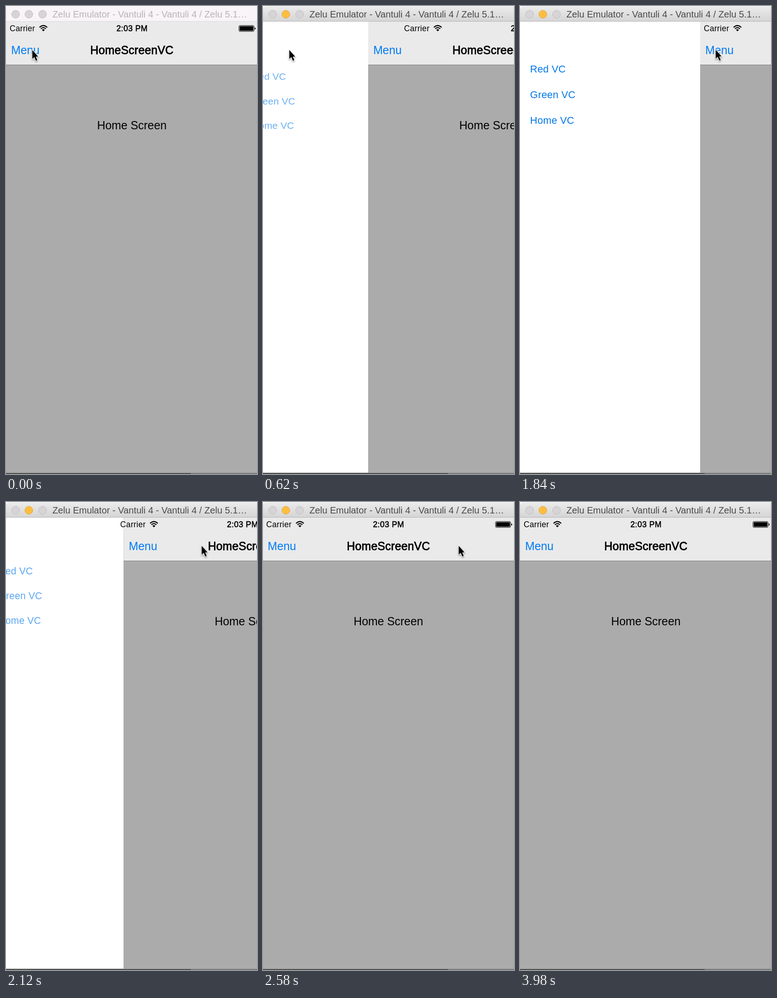
These frames come from a looping animation (549x1021 px, 4.04 s). An HTML page:

```html
<!DOCTYPE html>
<html lang="en">
<head>
<meta charset="utf-8">
<title>Slide-out menu</title>
<style>
  :root {
    --loop: 4040ms;
    --fall: cubic-bezier(.3333, 0, .6667, .3333); /* constant acceleration */
    --open: 395px;
  }
  html, body { margin: 0; width: 100%; height: 100%; overflow: hidden; background: #fff; }
  #stage {
    position: relative; width: 549px; height: 1021px; overflow: hidden; background: #fff;
    font-family: "Liberation Sans", Arial, Helvetica, sans-serif;
  }
  #stage div, #stage svg { position: absolute; }
  .text { white-space: pre; line-height: 30px; height: 30px; }
  .medium { -webkit-text-stroke: .8px #000; }

  /* window chrome */
  #bar {
    left: 0; top: 1px; width: 549px; height: 32px; border-radius: 6px 0 0 0;
    border-bottom: 1px solid #b4b4b4;
    background: linear-gradient(#ebebeb, #d5d5d5);
    animation: bar-focus var(--loop) step-end infinite;
  }
  .light {
    top: 8px; width: 16px; height: 16px; border-radius: 50%;
    background: #d6d4d6; border: 1px solid #bfbdbf;
  }
  #mid { background: #fdbe40; border-color: #e2a436; animation: mid-focus var(--loop) step-end infinite; }
  #label {
    left: 101.5px; top: 2px; font-size: 20.2px; color: #4a4a4a;
    animation: label-focus var(--loop) step-end infinite;
  }
  @keyframes bar-focus {
    0% { background: #f8f4f8; border-color: #dcd9dc; }
    3.465%, 100% { background: linear-gradient(#ebebeb, #d5d5d5); border-color: #b4b4b4; }
  }
  @keyframes mid-focus {
    0% { background: #d6d4d6; border-color: #bfbdbf; }
    3.465%, 100% { background: #fdbe40; border-color: #e2a436; }
  }
  @keyframes label-focus {
    0% { color: #b7b4b7; }
    3.465%, 100% { color: #4a4a4a; }
  }

  /* drawer: every part falls open and falls shut */
  #menu {
    left: 0; top: 34px; width: 549px; height: 984px; color: #0377e8;
    font-size: 21.96px; letter-spacing: .2px;
    animation: menu var(--loop) var(--fall) infinite;
  }
  #menu .text { left: 22.4px; }
  #pane {
    left: 0; top: 34px; width: 552px; height: 984px; background: #ababab;
    font-size: 24.9px; animation: pane var(--loop) var(--fall) infinite;
  }
  #nav { left: 0; top: 0; width: 552px; height: 94px; background: #eaeaea; border-bottom: 1px solid #7e7e7e; }
  #status {
    left: 0; top: 34px; width: 549px; height: 30px;
    font-size: 17.57px; letter-spacing: .3px; animation: status var(--loop) var(--fall) infinite;
  }
  @keyframes pane {
    0%, 5.569% { transform: translateX(0); }
    18.416%, 44.926% { transform: translateX(var(--open)); }
    57.772% { transform: translateX(-1px); animation-timing-function: step-end; }
    65.35%, 100% { transform: translateX(0); }
  }
  /* the status bar runs slightly ahead of the pane */
  @keyframes status {
    0%, 5.569% { transform: translateX(0); }
    16.807%, 44.926% { transform: translateX(var(--open)); }
    57.104% { transform: translateX(-1px); animation-timing-function: step-end; }
    65.35%, 100% { transform: translateX(0); }
  }
  @keyframes menu {
    0%, 5.569%, 57.772%, 100% { transform: translateX(-137.5px) scale(.9); opacity: 0; }
    18.416%, 44.926% { transform: translateX(0) scale(1); opacity: 1; }
  }

  /* pointer */
  #cursor {
    left: 0; top: 0; width: 24px; height: 36px; overflow: visible;
    filter: drop-shadow(0 2px 1.5px rgba(0, 0, 0, .35));
    animation: cursor var(--loop) ease-in-out infinite;
  }
  @keyframes cursor {
    0%, 26.73% { transform: translate(57px, 95px); }
    40.1%, 67.8% { transform: translate(427.5px, 94.5px); }
    83.2%, 100% { transform: translate(-30px, 100px); }
  }

  /* strip below the window */
  #edge { left: 0; top: 1018px; width: 549px; height: 3px; background: linear-gradient(#9a9a9a 1px, #777 1px); }
  #edge div { left: 0; top: 1px; width: 404px; height: 2px; background: #4a4a4a; }
</style>
</head>
<body>
<div id="stage">
  <div id="menu">
    <div class="text" style="top:89px">Red VC</div>
    <div class="text" style="top:145px">Green VC</div>
    <div class="text" style="top:201px">Home VC</div>
  </div>

  <div id="pane">
    <div id="nav">
      <div class="text" style="left:11.2px;top:47px;color:#007af5">Menu</div>
      <div class="text medium" style="left:184.3px;top:47px;letter-spacing:.2px">HomeScreenVC</div>
    </div>
    <div class="text" style="left:199.2px;top:211px">Home Screen</div>
  </div>

  <div id="status">
    <div class="text" style="left:8px;top:0">Carrier</div>
    <svg style="left:72px;top:7px" width="20" height="16" viewBox="0 0 20 16">
      <g fill="none" stroke="#000" stroke-width="2.2">
        <path d="M1.2 5.6Q9.7 -2.4 18.2 5.6"/>
        <path d="M4.2 8.7Q9.7 3.6 15.2 8.7"/>
      </g>
      <path d="M6.4 10.9Q9.7 7.9 13 10.9L9.7 14.3Z"/>
    </svg>
    <div class="text medium" style="left:241.4px;top:0;letter-spacing:.45px;-webkit-text-stroke-width:.6px">2:03 PM</div>
    <svg style="left:508px;top:7px" width="40" height="17" viewBox="0 0 40 17">
      <rect x="1.5" y="1.5" width="33" height="13" rx="2.5" fill="none" stroke="#000"/>
      <rect x="3" y="3" width="30" height="10" rx="1.2"/>
      <path d="M36 5.5Q38 6 38 8T36 10.5Z"/>
    </svg>
  </div>

  <div id="bar">
    <div class="light" style="left:12px"></div>
    <div class="light" id="mid" style="left:41px"></div>
    <div class="light" style="left:71px"></div>
    <div class="text" id="label">Zelu Emulator - Vantuli 4 - Vantuli 4 / Zelu 5.1…</div>
  </div>

  <div id="edge"><div></div></div>

  <svg id="cursor" viewBox="0 0 24 36">
    <path d="M.5 1V20.5L5 16.6 8.4 24.6 11.6 23.2 8.3 15.6H13.6Z"
      stroke="#fff" stroke-width="2.4" stroke-linejoin="round" paint-order="stroke"/>
  </svg>
</div>
</body>
</html>
```
